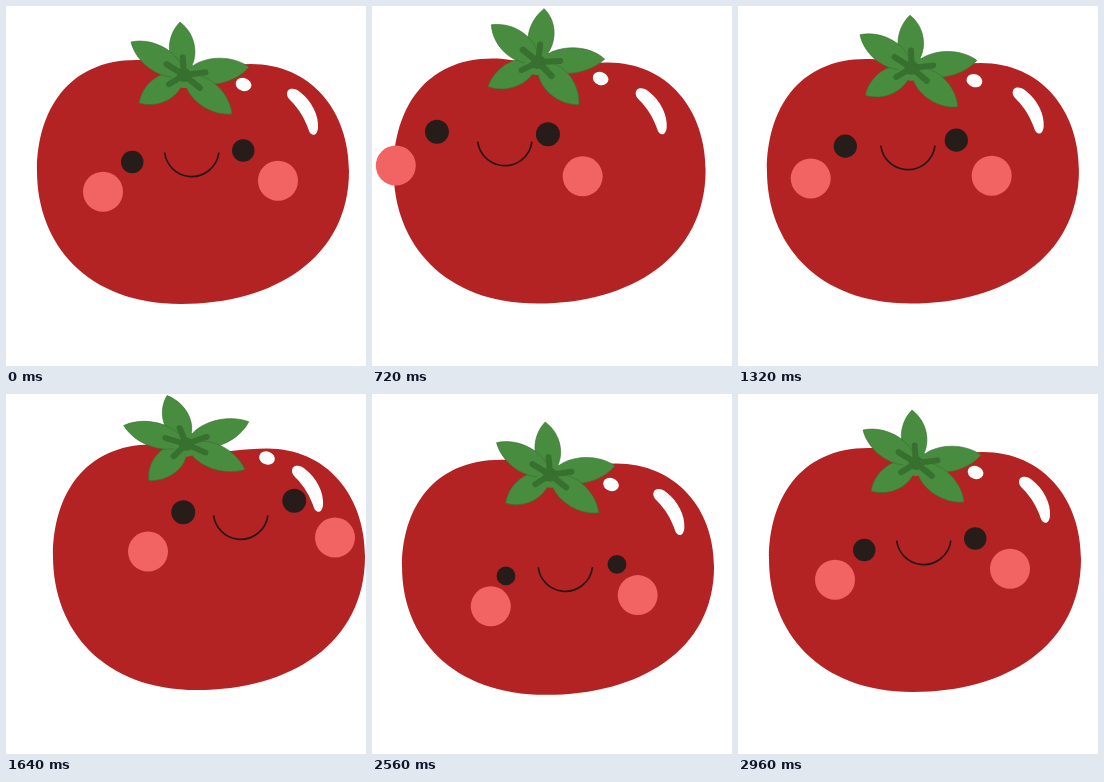
An HTML page with a canvas that plays this animation: 360x360 px, repeating every 3.68 s.

```html
<!DOCTYPE html>
<html lang="en">
<head>
<meta charset="utf-8">
<title>Tomato</title>
<style>
html, body { margin: 0; width: 100%; height: 100%; overflow: hidden; background: #fff; }
canvas { display: block; width: 360px; height: 360px; }
</style>
</head>
<body>
<canvas id="stage" width="360" height="360"></canvas>
<script>
const ctx = document.getElementById('stage').getContext('2d');
const LOOP = 3680, STEP = 40;
const RED = '#b42324', PINK = '#f26363', DARK = '#261c1a', GREEN = '#488c3f', VEIN = '#38702f';

const bodyPath = new Path2D('M31 165C31 105 62 54 130 54C155 54 165 62 187 62C205 62 220 58 245 58'
  + 'C305 58 343 105 343 165C343 252 268 298 175 298C81 298 31 238 31 165Z');
const glintPath = new Path2D('M281 88C281 82 288 81 294 86C306 95 313 110 312 122'
  + 'C311 131 305 130 303 125C299 113 293 103 285 95C282 92 281 90 281 88Z');
const leafTips = [[174, 16], [243, 61], [226, 108], [133, 97], [125, 36]];

// Smooth step from 0 to 1 between times a and b
function ease(t, a, b) {
  const s = Math.min(1, Math.max(0, (t - a) / (b - a)));
  return s * s * (3 - 2 * s);
}

function oval(x, y, rx, ry, color, turn = 0) {
  ctx.beginPath();
  ctx.ellipse(x, y, rx, ry, turn, 0, 7);
  ctx.fillStyle = color;
  ctx.fill();
}

// Two ovals around (x, y), the right one lower by tilt
function pair(x, y, spread, tilt, r, color) {
  for (const side of [-1, 1]) oval(x + side * spread, y + side * tilt / 2, r, r, color);
}

function fillMoved(path, color, dx, dy, sy = 1) {
  ctx.save();
  ctx.translate(dx, dy);
  ctx.scale(1, sy);
  ctx.fillStyle = color;
  ctx.fill(path);
  ctx.restore();
}

// Pointed blade from (x, y) along (dx, dy), bulging w to each side
function blade(x, y, dx, dy, w) {
  const len = Math.hypot(dx, dy), nx = -dy / len * w, ny = dx / len * w;
  const at = (k, side) => [x + dx * k + nx * side, y + dy * k + ny * side];
  ctx.beginPath();
  ctx.moveTo(x, y);
  ctx.bezierCurveTo(...at(0.2, 1), ...at(0.72, 1), x + dx, y + dy);
  ctx.bezierCurveTo(...at(0.72, -1), ...at(0.2, -1), x, y);
  ctx.fillStyle = GREEN;
  ctx.fill();
  ctx.strokeStyle = VEIN;
  ctx.lineWidth = 0.6;
  ctx.stroke();
}

function leaves(x, y) {
  const rays = leafTips.map(([tx, ty]) => [tx - x, ty - y]);
  for (const [dx, dy] of rays) blade(x, y, dx, dy, 17);
  oval(x, y, 13, 13, GREEN);
  oval(x, y, 7, 7, VEIN);
  ctx.strokeStyle = VEIN;
  ctx.lineCap = 'round';
  ctx.lineWidth = 6;
  for (const [dx, dy] of rays) {
    ctx.beginPath();
    ctx.moveTo(x, y);
    ctx.lineTo(x + dx * 0.33, y + dy * 0.33);
    ctx.stroke();
  }
}

function draw(t) {
  // How far the tomato looks left, looks right and ducks
  const left = 1.06 * (ease(t, 400, 780) - ease(t, 1120, 1460));
  const right = ease(t, 1240, 1640) - ease(t, 2340, 2600);
  const duck = ease(t, 2340, 2570) - ease(t, 2580, 2880);
  const turn = left + right;
  const move = (l, r, d) => l * left + r * right + d * duck;

  ctx.fillStyle = '#fff';
  ctx.fillRect(0, 0, 360, 360);

  const top = 54 + move(-1.5, -3.5, 12), bottom = 298 + move(-0.5, -2, 3);
  const sy = (bottom - top) / 244;
  fillMoved(bodyPath, RED, move(-9.5, 16, -2), top - 54 * sy, sy);
  oval(237.5 + move(-9, 23.5, 0), 78.5 + move(-6, -14.5, 13), 8, 6.5, '#fff', 0.35);
  fillMoved(glintPath, '#fff', move(-17.5, 5, 0), move(-0.5, -11, 13));

  ctx.save();
  ctx.translate(180 + move(-11, 0.6, 0), 64 + move(-13, -19, 13));
  ctx.transform(1, move(0.08, -0.23, 0), move(-0.19, 0.28, 0), 1 - 0.067 * right, 0, 0);
  ctx.translate(-180, -64);
  leaves(178, 69);
  ctx.restore();

  const x = 181.75 + move(-62, 51, 4.5), y = 150.25 + move(-23.5, -37.7, 28.5);
  const spread = 87.5 + 6 * turn - 14.5 * duck;
  pair(x + 2.75 + move(-6, 0, 0), y + 30 + 8 * turn, spread, -11 + move(22, -3, 0), 20, PINK);
  pair(x, y, 55.5, -11.5 + move(14, 0, 0), spread / 7.8, DARK);

  ctx.beginPath();
  ctx.arc(x + 4 + move(8.5, -2, 0), y - 7 + 12.5 * turn, 27.3, 0.12, Math.PI - 0.12);
  ctx.strokeStyle = '#2a1715';
  ctx.lineWidth = 1.7;
  ctx.stroke();
}

const start = performance.now();
function tick() {
  const t = (performance.now() - start) % LOOP;
  draw(Math.floor(t / STEP) * STEP);
  requestAnimationFrame(tick);
}
tick();
</script>
</body>
</html>
```
